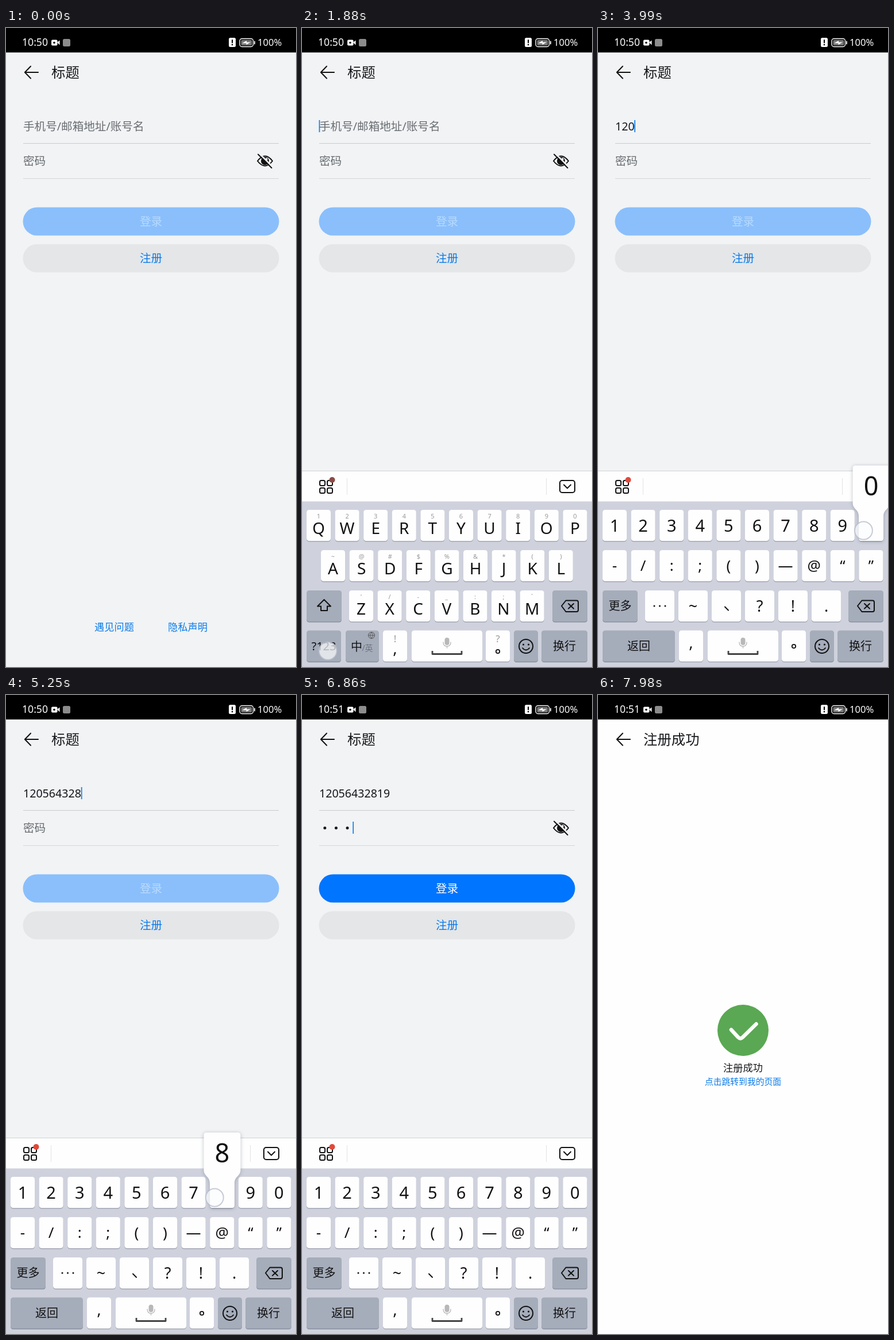
Write an HTML page that moves like this. It is 505 px wide and 1110 px high and loops after 8000 ms.

```html
<!DOCTYPE html>
<html lang="zh-CN">
<head>
<meta charset="utf-8">
<title>登录</title>
<style>
html, body { margin: 0; width: 100%; height: 100%; overflow: hidden; background: #f1f3f5; }
svg { display: block; width: 100vw; height: 100vh; font-family: "Noto Sans", "Noto Sans CJK SC", "Noto Sans CJK", sans-serif; }
text { white-space: pre; }
</style>
</head>
<body>
<svg id="stage" viewBox="0 0 505 1110"></svg>
<script>
const LOOP = 8000, W = 505;
const BG = '#f1f3f5', BLUE = '#0a7bea', INK = '#16181b';
const PHONE = '12056432819';
const TYPED = [3200, 3800, 3950, 4110, 4270, 4430, 4640, 4900, 5190, 5380, 5580];
const DOTS = [6650, 6750, 6850, 6950];

// Markup helpers; text is placed by its vertical centre.
const txt = (x, y, s, size, fill = INK, anchor = 'start', extra = '') =>
  `<text x="${x}" y="${y + size * .365}" font-size="${size}" fill="${fill}" text-anchor="${anchor}" ${extra}>${s.replace('&', '&amp;')}</text>`;
const mid = (x, y, s, size, fill, extra) => txt(x, y, s, size, fill, 'middle', extra);
const box = (x, y, w, h, r, fill, extra = '') =>
  `<rect x="${x}" y="${y}" width="${w}" height="${h}" rx="${r}" fill="${fill}" ${extra}/>`;
const dot = (x, y, r, fill, extra = '') => `<circle cx="${x}" cy="${y}" r="${r}" fill="${fill}" ${extra}/>`;
const line = (d, stroke = '#111', w = 2, extra = '') =>
  `<path d="${d}" fill="none" stroke="${stroke}" stroke-width="${w}" stroke-linecap="round" stroke-linejoin="round" ${extra}/>`;
const MEDIUM = 'font-weight="500"';

const header = title =>
  line('M33 77H56M43 66.5L32.8 77L43 87.5', '#111', 2) + txt(79, 77, title, 24.4, INK, 'start', MEDIUM);

function statusBar() {
  return box(0, 0, W, 42.5, 0, '#000')
    + txt(28, 25, '', 17.6, '#fff', 'start', MEDIUM + ' id="clock"')
    + box(79, 20.5, 10.5, 10, 2, '#fff') + '<path d="M89 25L93.5 21.5V29.5Z" fill="#fff"/>' + dot(84, 25.5, 1.8, '#000')
    + box(99, 19, 13, 13, 2.5, '#8c8c8c')
    + box(388, 17, 12, 16, 2.5, '#fff') + box(393, 20, 2, 6.5, 1, '#000') + dot(394, 29, 1.3, '#000')
    + box(407, 18.5, 23.5, 14, 4, 'none', 'stroke="#fff" stroke-width="1.4"')
    + box(409.3, 20.8, 19, 9.4, 2, '#777') + '<path d="M411 26.5L419 22V24.8H426L418.5 29V26.5Z" fill="#fff"/>'
    + box(432, 22.5, 1.8, 6, 1, '#fff')
    + txt(438, 25, '100%', 16.6, '#fff', 'start', MEDIUM);
}

function loginPage() {
  const eye = `<g id="eye">${line('M438 231Q451 214 464 231Q451 248 438 231Z', '#111', 2)}${dot(451, 231, 7, '#111')}
    ${dot(453.5, 228, 2.2, BG)}${line('M441 218L465 242', BG, 2.5)}${line('M439 219.5L462.5 243')}</g>`;
  return box(0, 42, W, 1068, 0, BG) + header('标题')
    + box(30, 141, 445, 59, 28, '#e1e3e5', 'id="focus1"') + box(30, 201, 445, 60, 28, '#e1e3e5', 'id="focus2"')
    + txt(30, 171, '手机号/邮箱地址/账号名', 19.6, '#696c70', 'start', 'id="hint1"')
    + txt(30, 171, '', 19.6, INK, 'start', 'id="phone"')
    + txt(30, 231, '密码', 19.6, '#696c70', 'start', 'id="hint2"')
    + DOTS.map((_, i) => dot(39.8 + 19.6 * i, 231, 2.5, INK, 'class="pw"')).join('')
    + box(30, 200, 445, 1, 0, '#c9cbcd') + box(30, 261, 445, 1, 0, '#d3d5d7')
    + box(29.5, 160, 1.8, 21, 0, '#1583ec', 'id="caret"') + eye
    + box(29.5, 311.5, 446, 49, 24.5, '#8abffc', 'id="login"') + mid(252.5, 336, '登录', 19.6, '#b9dafd', MEDIUM + ' id="loginText"')
    + box(29.5, 375.5, 446, 49, 24.5, '#e4e6e8') + mid(252.5, 400, '注册', 19.6, BLUE, MEDIUM)
    + mid(188.5, 1041, '遇见问题', 17.2, BLUE, MEDIUM) + mid(316.5, 1041, '隐私声明', 17.2, BLUE, MEDIUM);
}

function profilePage() {
  return box(0, 42, W, 1068, 0, '#fefefe') + box(0, 42, W, 222, 0, BG)
    + dot(252.5, 151, 32.5, '#b9b9b9', 'stroke="#fff" stroke-width="3"')
    + dot(252.5, 143.5, 7.3, '#fff') + '<path d="M238 166Q238 152 252.5 152T267 166Z" fill="#fff"/>'
    + mid(252.5, 214, '顾青青', 24, '#111', MEDIUM) + box(0, 340, W, 1, 0, '#f2f2f2');
}

function donePage() {
  return box(0, 42, W, 1068, 0, '#fefefe') + header('注册成功')
    + dot(252.5, 582.5, 44.5, '#5aa853') + line('M232 581.5L244 594.5Q248 598.5 252 594.5L275.5 571.5', '#fff', 6.5)
    + mid(252.5, 648, '注册成功', 17.2, INK) + mid(252.5, 672, '点击跳转到我的页面', 14.8, BLUE);
}

// Keyboard
const keyX = i => 8 + 49.6 * i;
const ROWS = [837, 907, 977, 1046.5];
function key(x, row, w, label = '', dark = false, size = 20, dy = 27) {
  const y = ROWS[row];
  return box(x, y + 1.5, w, 54, 4.5, dark ? '#8b92a1' : '#a3a8b4') + box(x, y, w, 54, 4.5, dark ? '#a5acba' : '#fefefe')
    + mid(x + w / 2, y + dy, label, size, '#111');
}
const letters = (chars, hints, x, row) => [...chars].map((c, i) =>
  key(x + 49.6 * i, row, 42, c, false, 28, 32) + mid(x + 49.6 * i + 21, ROWS[row] + 10.5, hints[i], 11, '#999')).join('');
const symbols = (list, x, step, w, row, size) =>
  list.map((s, i) => key(x + step * i, row, w, s, false, size)).join('');

function commonKeys() {
  return key(436, 2, 61, '', true) + line('M452 1004L459.5 994.5H478Q481 994.5 481 997.5V1011Q481 1014 478 1014H459.5ZM464 1000L473 1008.5M473 1000L464 1008.5')
    + key(191, 3, 123) + box(248.5, 1059, 8, 13, 4, '#b8b8b8')
    + line('M246 1067Q246 1074 252.5 1074T259 1067M252.5 1074V1077', '#b8b8b8', 1.3)
    + line('M227 1082V1087.5H278V1082', '#444', 2.8, 'style="stroke-linecap:butt"')
    + key(369, 3, 42, '', true) + dot(390, 1074, 12, 'none', 'stroke="#111" stroke-width="2"')
    + dot(385.5, 1071, 1.6, '#111') + dot(394.5, 1071, 1.6, '#111') + line('M384 1077Q390 1084 396 1077', '#111', 1.8)
    + key(417, 3, 80, '换行', true)
    + key(141, 3, 42) + key(320, 3, 42);
}

function letterKeys() {
  return letters('QWERTYUIOP', '1234567890', 8, 0) + letters('ASDFGHJKL', '~@#$%&*()', 33, 1)
    + letters('ZXCVBNM', "'/-_:;`", 82, 2)
    + key(8, 2, 61, '', true) + line('M38.5 993L50 1004.5H44V1012H33V1004.5H27Z')
    + key(8, 3, 60, '?123', true) + key(76, 3, 58, '', true)
    + mid(95, 1075, '中', 20) + mid(114, 1077, '/英', 14, '#70757f')
    + dot(121, 1055, 5.5, 'none', 'stroke="#555" stroke-width="1"') + line('M116 1055H126M121 1050Q116 1055 121 1060M121 1050Q126 1055 121 1060', '#555', .9)
    + mid(162, 1077, ',', 28) + mid(162, 1061, '!', 17, '#999')
    + dot(341, 1083, 3.2, 'none', 'stroke="#111" stroke-width="1.8"') + mid(341, 1061, '?', 17, '#999');
}

function numberKeys() {
  return symbols([...'1234567890'], 8, 49.6, 42, 0, 29) + symbols([...'-/:;()—@“”'], 8, 49.6, 42, 1, 26)
    + symbols(['', '~', '', '?', '!', '.'], 82, 58, 51, 2, 27)
    + [98, 107.5, 117].map(x => dot(x, 1004, 1.5, '#111')).join('') + line('M221 1005.5L227 1011.5', '#111', 2)
    + key(8, 2, 61, '更多', true) + key(8, 3, 126, '返回', true)
    + mid(162, 1067, ',', 28) + dot(341, 1074, 3.2, 'none', 'stroke="#111" stroke-width="1.8"');
}

function keyboard() {
  const tiles = [[31, 786], [44, 786], [31, 799], [44, 799]]
    .map(([x, y]) => box(x, y, 9, 9, 2.5, 'none', 'stroke="#111" stroke-width="2"')).join('');
  return box(0, 769, W, 53.5, 0, '#fefefe') + box(0, 769, W, 1, 0, '#cfd1d4', 'id="edge"') + box(0, 822.5, W, 400, 0, '#cfd2dd')
    + tiles + dot(52.5, 785, 5, '#8b4b44', 'id="badge"')
    + box(78, 782, 1, 29, 0, '#e3e3e3') + box(425, 782, 1, 29, 0, '#e3e3e3')
    + box(449, 786, 26, 21, 4, 'none', 'stroke="#111" stroke-width="2"') + line('M456 793.5L462 799.5L468 793.5')
    + commonKeys() + `<g id="abc">${letterKeys()}</g><g id="num">${numberKeys()}</g>`;
}

const popup = `<path d="M-27 760H27Q32 760 32 765V825C32 836 21.5 836 21.5 848V886Q21.5 891 17 891H-17Q-21.5 891 -21.5 886V848C-21.5 836 -32 836 -32 825V765Q-32 760 -27 760Z"
  fill="#fefefe" style="filter:drop-shadow(0 1px 3px rgba(60,70,90,.35))"/>` + mid(0, 796, '', 45, '#111', 'id="popText"');

const cover = (id, content) =>
  `<clipPath id="${id}Clip"><rect id="${id}Mask" y="42" width="${W}" height="1068"/></clipPath>
   <g clip-path="url(#${id}Clip)"><g id="${id}">${content}</g></g>`;

document.getElementById('stage').innerHTML =
  `<g id="home">${loginPage()}</g>` + cover('profile', profilePage()) + cover('done', donePage())
  + `<g id="kb">${keyboard()}</g><g id="pop">${popup}</g>`
  + dot(0, 0, 15.5, '#fbfcfd', 'id="touch" fill-opacity=".7" stroke="#b4bac8" stroke-width="2" stroke-opacity=".75"')
  + statusBar();

const $ = id => document.getElementById(id);
const show = (el, on) => el.setAttribute('visibility', on ? 'inherit' : 'hidden');
const set = (id, attr, v) => $(id).setAttribute(attr, v);
const within = (t, a, b) => t >= a && t < b;
const span = (t, a, b) => Math.min(1, Math.max(0, (t - a) / (b - a)));
const easeOut = u => 1 - (1 - u) ** 3;
const easeInOut = u => u < .5 ? 4 * u ** 3 : 1 - 4 * (1 - u) ** 3;
const keyOf = d => (+d + 9) % 10;

// start, end, x, y of each press
const TOUCHES = [
  [330, 560, 210, 172], [1750, 1950, 45, 1082], [2290, 2560, 347, 1014], [6090, 6300, 306, 229],
  [7050, 7190, 300, 340], [7710, 7790, 300, 402],
  ...TYPED.map((s, i) => [s - 20, s + 130, keyX(keyOf(PHONE[i])) + 8, 873])
];

// The covering page unveils from the right while its content travels half as far.
function slide(id, p) {
  set(id + 'Mask', 'x', W * (1 - p));
  set(id, 'transform', `translate(${W / 2 * (1 - p)})`);
}

function draw(t) {
  const count = TYPED.filter(s => t >= s).length;
  const secret = DOTS.filter(s => t >= s).length;
  const second = t >= 6160;

  $('clock').textContent = t < 5800 ? '10:50' : '10:51';
  $('phone').textContent = PHONE.slice(0, count);
  show($('hint1'), !count);
  show($('hint2'), !secret);
  document.querySelectorAll('.pw').forEach((el, i) => show(el, i < secret));
  show($('focus1'), within(t, 330, 560));
  show($('focus2'), within(t, 6090, 6300));
  show($('eye'), !within(t, 3780, 5620));
  set('login', 'fill', secret ? '#0075ff' : '#8abffc');
  set('loginText', 'fill', secret ? '#fff' : '#b9dafd');

  const blinkOff = within(t, 1150, 1480) || within(t, 1950, 2290) || within(t, 2560, 2830) || within(t, 5900, 6400);
  show($('caret'), within(t, 650, 7120) && !blinkOff);
  set('caret', 'x', second ? 29.5 + 19.6 * secret : 29.5 + 11.25 * count);
  set('caret', 'y', second ? 220 : 160);

  const up = easeOut(span(t, 650, 1035)) - easeInOut(span(t, 6150, 6310))
    + easeOut(span(t, 6390, 6620)) - easeInOut(span(t, 7110, 7250));
  set('kb', 'transform', `translate(0 ${222 * (1 - up)})`);
  set('kb', 'opacity', up);
  show($('abc'), t < 1950);
  show($('num'), t >= 1950);
  show($('edge'), t >= 1035);
  set('badge', 'fill', t < 3170 ? '#8b4b44' : '#de4a3c');

  const last = count - 1;
  const pressed = count > 0 && t < TYPED[last] + 130;
  show($('pop'), pressed);
  if (pressed) {
    set('pop', 'transform', `translate(${keyX(keyOf(PHONE[last])) + 21.2})`);
    $('popText').textContent = PHONE[last];
  }

  const press = TOUCHES.find(([a, b]) => within(t, a, b));
  show($('touch'), press);
  if (press) set('touch', 'transform', `translate(${press[2]} ${press[3]})`);

  const profile = easeInOut(span(t, 7260, 7560)) - easeInOut(span(t, 7600, 7720));
  const done = easeInOut(span(t, 7750, 7960));
  slide('profile', profile);
  slide('done', done);
  set('home', 'transform', `translate(${-.2 * W * Math.max(profile, done)})`);
}

const start = performance.now();
function tick() {
  draw((performance.now() - start) % LOOP);
  requestAnimationFrame(tick);
}
tick();
</script>
</body>
</html>
```
